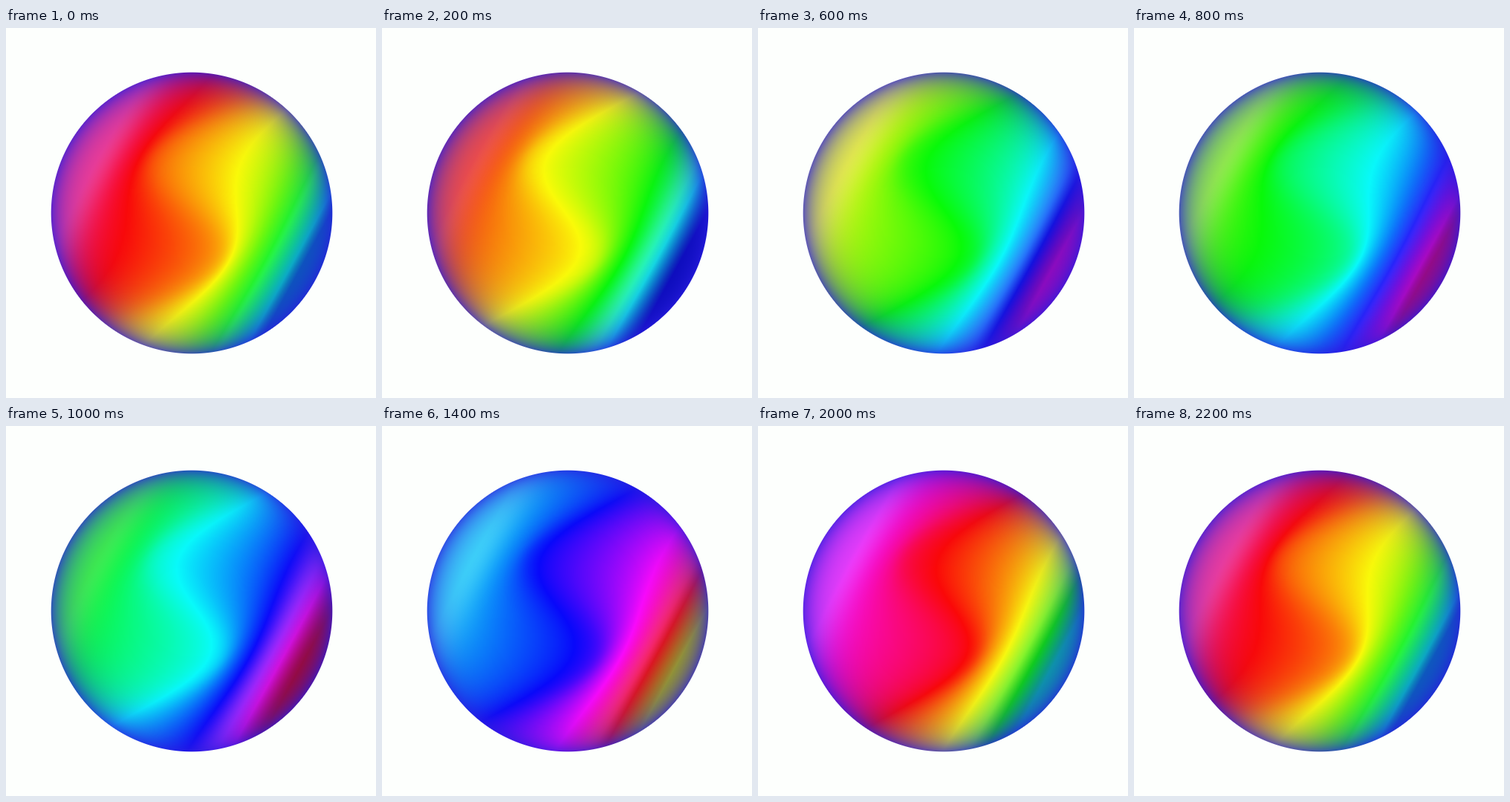
These frames come from a looping animation (498x498 px, 2.3 s). An HTML page with a canvas:

```html
<!DOCTYPE html>
<html lang="en">
<head>
<meta charset="utf-8">
<title>Rainbow sphere</title>
<style>
  html, body { margin: 0; width: 100%; height: 100%; overflow: hidden; background: #fdfffd; }
  canvas { display: block; width: 498px; height: 498px; }
</style>
</head>
<body>
<canvas id="stage" width="498" height="498"></canvas>
<script>
const SIZE = 498, CX = 250, CY = 249, R = 189.3;
const STEP = 100, STEPS = 23, CYCLE = 22.15;
const RIM = [40, 28, 222];
const TAU = 2 * Math.PI;

const mix = (a, b, f) => a + (b - a) * f;
const clamp = (v, lo, hi) => Math.min(hi, Math.max(lo, v));
const bell = (v, mid, width) => Math.exp(-(((v - mid) / width) ** 2));

// Position across the bands, 0 at the left to 1 at the lower right.
// Bands are slanted lines; the middle ones are bent into an S.
function across(x, y) {
  const flat = x + .55 * (y - 248);
  const swing = 58 * Math.sin(TAU * (y - 100) / 285);
  let c = flat;
  for (let i = 0; i < 16; i++) c = flat + swing * bell(c, 240, 80);
  return clamp((c - 85) / 345, 0, 1.02);
}

function rainbow(hue) {
  return [0, 120, 240].map(peak => {
    const away = Math.abs(((hue - peak + 540) % 360 + 360) % 360 - 180);
    return mix(8, 250, clamp(2 - away / 60, 0, 1));
  });
}
const palette = Array.from({ length: 720 }, (_, n) => rainbow(n / 2));

// Everything about a pixel that does not change with time
const pixels = [];
for (let y = 0; y < SIZE; y++) {
  for (let x = 0; x < SIZE; x++) {
    const depth = R - Math.hypot(x + .5 - CX, y + .5 - CY);
    if (depth < -.5) continue;
    const u = across(x, y);
    pixels.push({
      at: (y * SIZE + x) * 4,
      hue: -34 + 120 * u + 100 * u ** 5.5,
      pale: .22 * bell(u, 0, .1) + .12 * bell(u, .87, .06),
      shade: 1 - .28 * clamp((u - .88) / .12, 0, 1),
      rim: .75 * Math.exp(-Math.max(depth, 0) / 22),
      alpha: 255 * clamp(depth + .5, 0, 1)
    });
  }
}

const ctx = document.getElementById('stage').getContext('2d');
const image = ctx.createImageData(SIZE, SIZE);

function draw(step) {
  const turn = step / CYCLE;
  const shift = 360 * turn + 8 * Math.cos(TAU * turn);
  for (const p of pixels) {
    const index = Math.round((p.hue + shift) * 2);
    const color = palette[(index % 720 + 720) % 720];
    for (let c = 0; c < 3; c++) {
      const base = mix(color[c], 255, p.pale) * p.shade;
      image.data[p.at + c] = mix(base, RIM[c], p.rim);
    }
    image.data[p.at + 3] = p.alpha;
  }
  ctx.putImageData(image, 0, 0);
}

const start = performance.now();
let shown = 0;
draw(0);

function tick() {
  const step = Math.floor(Math.max(0, performance.now() - start) / STEP) % STEPS;
  if (step !== shown) draw(shown = step);
  requestAnimationFrame(tick);
}
requestAnimationFrame(tick);
</script>
</body>
</html>
```
